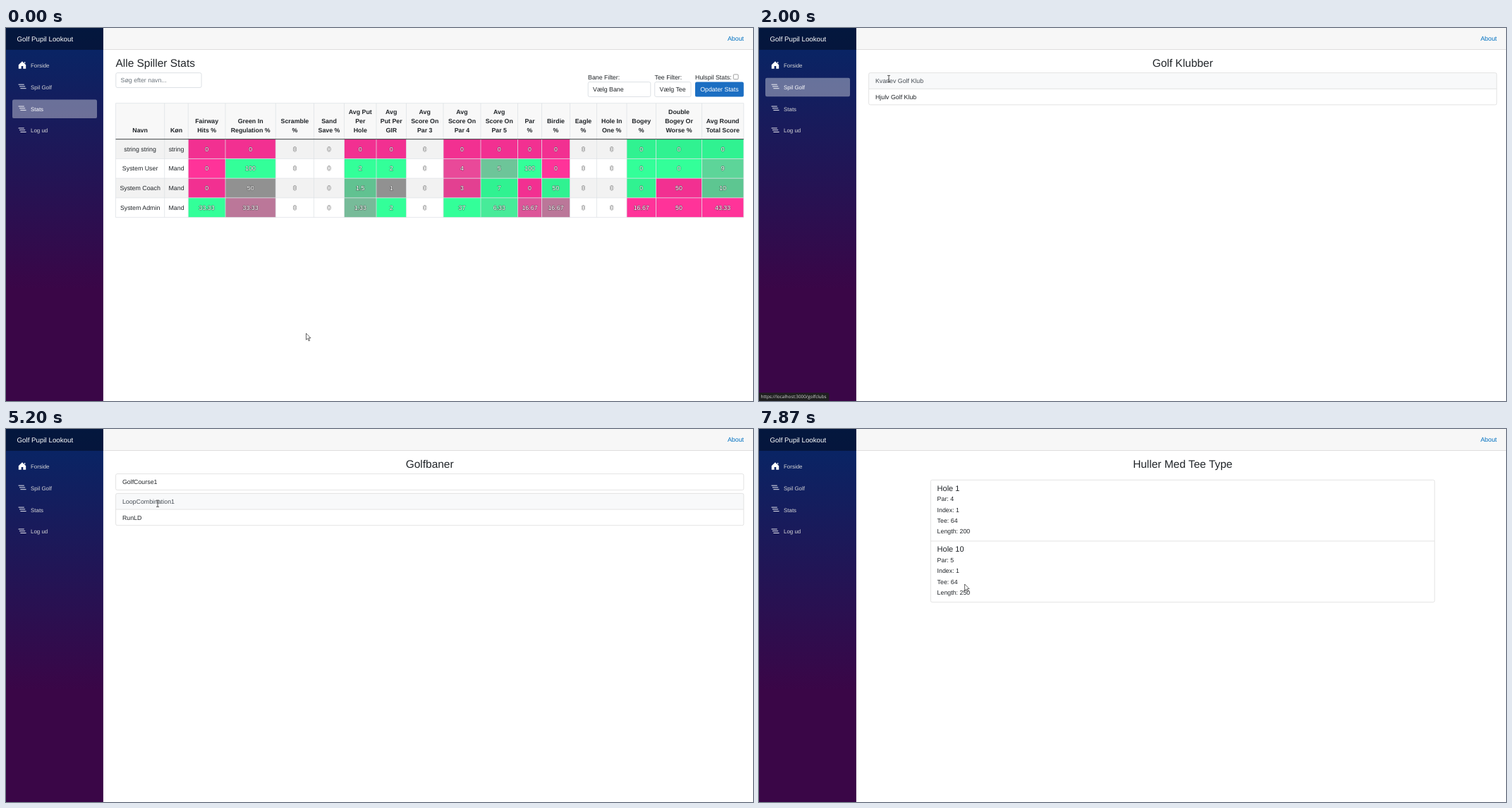
Write an HTML page that moves like this. It is 1059x529 px and loops after 8000 ms.

```html
<!DOCTYPE html>
<html lang="da">
<head>
<meta charset="utf-8">
<title>Golf Pupil Lookout</title>
<style>
  html, body { margin: 0; width: 100%; height: 100%; overflow: hidden; background: #fff; }
  svg { display: block; width: 100%; height: 100%; cursor: default; }
  text { font: 8.83px "Liberation Sans", Arial, sans-serif; fill: #212529; text-rendering: geometricPrecision; white-space: pre; }
  .h { font-size: 15.45px; }
  .h5 { font-size: 11.03px; }
  .m { text-anchor: middle; }
  .b { font-weight: bold; }
  .nav { font-size: 7.94px; fill: #d7d7d7; }
  .on { fill: #fff; }
  .cell { fill: #fff; stroke: rgba(50, 50, 50, .62); stroke-width: 1px; paint-order: stroke; }
  .box { fill: none; stroke: #dcdcdc; stroke-width: .8; }
  .field { fill: #fff; stroke: #ced4da; stroke-width: .7; }
  .url { font: 6.33px "Open Sans", "Noto Sans", sans-serif; fill: #dcdcdc; }
</style>
</head>
<body>
<svg id="stage" viewBox="0 0 1059 529" xmlns="http://www.w3.org/2000/svg"></svg>
<script>
const text = (x, y, s, cls = '') => `<text x="${x}" y="${y}" class="${cls}">${s}</text>`;
const rect = (x, y, w, h, attrs = '') => `<rect x="${x}" y="${y}" width="${w}" height="${h}" ${attrs}/>`;
const group = (id, body) => `<g id="${id}">${body}</g>`;
const title = s => text(600.65, 55.2, s, 'h m');

// Sidebar and top bar
const NAV = ['Forside', 'Spil Golf', 'Stats', 'Log ud'];
const NAV_STEP = 30.9;

function navItem(label, i) {
  const y = 53 + i * NAV_STEP;
  const icon = i
    ? `<path d="M18 ${y - 3.7}h7.4M19.4 ${y - 1}h7.4M20.8 ${y + 1.8}h7.4" stroke="#fff" stroke-width=".9" stroke-linecap="round"/>`
    : '<path d="M23 47.3l5.2 5v5.4h-3.9v-3.6h-2.6v3.6h-3.9v-5.4zM26 48h1.2v2.6l-1.2-1.2z" fill="#fff"/>';
  return rect(9, y - 13.2, 120, 26.5, 'rx="2.2" fill="#fff" class="navbg"') + icon + text(35, y + 2.7, label, 'nav');
}

const chrome = `
  <defs><linearGradient id="side" x2="0" y2="1">
    <stop stop-color="#052767"/><stop offset=".7" stop-color="#3a0647"/>
  </linearGradient></defs>
  ${rect(0, 0, 1059, 529, 'fill="#fff"')}
  ${rect(138, 0, 921, 30.9, 'fill="#f7f7f7"')}
  ${rect(138, 30.2, 921, .7, 'fill="#d6d5d5"')}
  ${rect(0, 0, 137.9, 529, 'fill="url(#side)"')}
  ${rect(0, 0, 137.9, 30.9, 'fill="#000" opacity=".4"')}
  <text x="15.5" y="18.6" class="on" style="font-size:9.75px">Golf Pupil Lookout</text>
  <text x="1046" y="18.2" text-anchor="end" style="fill:#0071c1">About</text>
  ${NAV.map(navItem).join('')}`;

// Stats table
const EDGES = [155.5, 224.7, 258.3, 311, 382.3, 436.5, 479.5, 525, 567.5, 620, 673,
  725.5, 759.5, 799.5, 837.5, 880, 921.5, 986.5, 1045.8];
const HEADS = ('Navn|Køn|Fairway,Hits %|Green In,Regulation %|Scramble,%|Sand,Save %|Avg Put,Per,Hole|' +
  'Avg,Put Per,GIR|Avg,Score On,Par 3|Avg,Score On,Par 4|Avg,Score On,Par 5|Par,%|Birdie,%|Eagle,%|' +
  'Hole In,One %|Bogey,%|Double,Bogey Or,Worse %|Avg Round,Total Score').split('|');
const PLAYERS = [
  'string string|string|0|0|0|0|0|0|0|0|0|0|0|0|0|0|0|0',
  'System User|Mand|0|100|0|0|2|2|0|4|5|100|0|0|0|0|0|9',
  'System Coach|Mand|0|50|0|0|1.5|1|0|3|7|0|50|0|0|0|50|10',
  'System Admin|Mand|33.33|33.33|0|0|1.33|2|0|37|6.33|16.67|16.67|0|0|16.67|50|43.33'
].map(r => r.split('|'));
const TOP = 106.7, BODY = 157.7, ROW = 27.72, LOW_IS_GOOD = 15;

function shade(col, value, striped) {
  const max = Math.max(...PLAYERS.map(p => +p[col]));
  if (!max) return null;
  const p = col >= LOW_IS_GOOD ? 1 - value / max : value / max;
  const k = striped ? .95 : 1;
  return `rgb(${[255 - 204 * p, 51 + 204 * p, 153].map(c => Math.round(c * k))})`;
}

function table() {
  const bottom = BODY + 4 * ROW, left = EDGES[0], right = EDGES[18], width = right - left;
  const mid = c => (EDGES[c] + EDGES[c + 1]) / 2;
  let out = rect(left, TOP, width, BODY - TOP, 'fill="#f8f8f8"');
  HEADS.forEach((head, c) => {
    const lines = head.split(',');
    lines.forEach((s, i) => out += text(mid(c), 148.4 - 13.24 * (lines.length - 1 - i), s, 'm b'));
  });
  let fills = '', labels = '';
  PLAYERS.forEach((player, r) => {
    const y = BODY + r * ROW, striped = r % 2 === 0;
    if (striped) fills += rect(left, y, width, ROW, 'fill="#f2f2f2"');
    player.forEach((s, c) => {
      const color = c > 1 && shade(c, +s, striped);
      if (color) fills += rect(EDGES[c], y, EDGES[c + 1] - EDGES[c], ROW, `fill="${color}"`);
      labels += text(mid(c), y + 16.95, s, c > 1 ? 'm cell' : 'm');
    });
  });
  let lines = `M${left} ${TOP}H${right}`;
  for (let r = 1; r < 5; r++) lines += `M${left} ${BODY + r * ROW}H${right}`;
  EDGES.forEach(x => lines += `M${x} ${TOP}V${bottom}`);
  return out + fills + `<path d="${lines}" stroke="#dee2e6" stroke-width=".75"/>` +
    `<path d="M${left} ${BODY}H${right}" stroke="#2b2f33" stroke-width=".9"/>` + labels;
}

const field = (x, w, y = 76.6) => rect(x, y, w, 20.9, 'rx="2.2" class="field"');
const stats = text(155.5, 55.2, 'Alle Spiller Stats', 'h') +
  field(155.8, 121.3, 63.6) + '<text x="162.5" y="77" style="fill:#6c757d">Søg efter navn...</text>' +
  text(825, 72.7, 'Bane Filter:') + text(919.5, 72.7, 'Tee Filter:') + text(977, 72.7, 'Hulspil Stats:') +
  rect(1031.3, 65.9, 6.8, 6.8, 'rx="1.2" fill="#fff" stroke="#767676" stroke-width=".7"') +
  field(825.2, 88.6) + text(832, 90.1, 'Vælg Bane') +
  field(919.7, 51.3) + text(926.5, 90.1, 'Vælg Tee') +
  rect(977, 76.5, 68.8, 21.1, 'rx="2.2" fill="#1b6ec2"') + text(1011.4, 90.1, 'Opdater Stats', 'm on') + table();

// List pages
const WIDE = [155.6, 1045.8], NARROW = [243.4, 957.8];
const LINE = 22.65;

function list([x0, x1], y, labels, h = LINE, draw) {
  const w = x1 - x0;
  const rows = labels.map((label, i) => {
    const top = y + i * h;
    if (draw) return draw(x0 + 9.2, top, label);
    return `<g class="row" data-y="${top}" data-x="${x0}" data-w="${w}">` +
      rect(x0, top, w, h, 'fill="#fff"') + text(x0 + 9.3, top + 14.5, label) + '</g>';
  });
  const seams = labels.slice(1).map((_, i) => `M${x0} ${y + (i + 1) * h}h${w}`).join('');
  return rows.join('') + rect(x0, y, w, h * labels.length, 'rx="2.2" class="box"') + `<path class="box" d="${seams}"/>`;
}

const hole = (x, y, [name, ...facts]) => text(x, y + 15.5, name, 'h5') +
  ['Par', 'Index', 'Tee', 'Length'].map((k, i) => text(x, y + 29.8 + i * 15.45, `${k}: ${facts[i]}`)).join('');

const clubs = title('Golf Klubber') + group('clubList', list(WIDE, 63.6, ['Kvarlev Golf Klub', 'Hjulv Golf Klub']));
const courses = title('Golfbaner') + list(WIDE, 63.6, ['GolfCourse1'], 23) +
  group('loops', list(WIDE, 91.4, ['LoopCombination1', 'RunLD']));
const tees = title('Vælg Tee Type') +
  text(243.4, 81.6, '<tspan class="b">Loop Combination:</tspan> LoopCombination1') +
  text(243.4, 103.7, 'Select a Tee Type:', 'b') + list(NARROW, 116.5, [64, 58, 55, 50, 43]);
const holes = title('Huller Med Tee Type') +
  list(NARROW, 72.3, [['Hole 1', 4, 1, 64, 200], ['Hole 10', 5, 1, 64, 250]], 86.65, hole);

const status = group('status', '<path d="M0 517.3H97.3Q99.3 517.3 99.3 519.3V529H0Z" fill="#1f1f20"/>' +
  text(2.6, 525.4, 'https://localhost:3000/golfclubs', 'url'));

const pointer = group('pointer', `
  <path id="arrow" d="M0 0V9.2L2.1 7.2 3.7 10.8 5.1 10.2 3.6 6.7H6.5Z" fill="#fff" stroke="#111" stroke-width=".65"/>
  <path id="beam" d="M-2 -4.6H2M0 -4.6V4.6M-2 4.6H2" fill="none" stroke="#333" stroke-width=".8"/>
  <path id="hand" d="M-1 .8Q0 -.6 1 .8V4.2L4.6 5Q5.4 5.3 5.3 6.2L4.5 10V12.3H-.8V10.8L-3.4 7.4Q-3.4 6 -2.2 6.4L-1 7.3Z" fill="#fff" stroke="#111" stroke-width=".7"/>`);

const SCENES = [[0, 'stats', stats], [1265, 'clubs', clubs], [3065, 'courses', courses],
  [5865, 'tees', tees], [7130, 'holes', holes]];

const stage = document.getElementById('stage');
stage.innerHTML = chrome + SCENES.map(([, id, body]) => group(id, body)).join('') + status + pointer;
const $ = id => document.getElementById(id);
const show = (el, on) => el.setAttribute('display', on ? 'inline' : 'none');
const navBgs = [...document.querySelectorAll('.navbg')];
const navTexts = [...document.querySelectorAll('.nav')];

// Pointer track: time, x, y
const TRACK = [[67, 425.5, 433], [933, 86, 73], [1733, 86, 73], [2000, 184, 72], [2600, 212, 77],
  [2733, 212, 96.5], [3467, 212, 97], [3533, 214, 97], [3700, 219, 128], [3933, 210, 76], [4867, 210, 76],
  [5200, 215, 105.7], [5400, 215, 105.7], [5533, 215, 106.3], [6333, 215, 106], [6400, 217.6, 105.6],
  [6600, 289.6, 127], [7533, 289.6, 127], [7867, 291.6, 220]];
const PRESSES = [[2930, 3065], [4265, 4395], [5800, 5865], [7065, 7130]];

const ramp = (t, a, b) => Math.min(1, Math.max(0, (t - a) / (b - a)));

function pointerAt(t) {
  const i = TRACK.findIndex(k => k[0] > t);
  if (i < 1) return TRACK[i ? TRACK.length - 1 : 0].slice(1);
  const [t0, x0, y0] = TRACK[i - 1], [t1, x1, y1] = TRACK[i];
  const u = ramp(t, t0, t1), e = u * u * (3 - 2 * u);
  return [x0 + (x1 - x0) * e, y0 + (y1 - y0) * e];
}

const inside = (px, py, x, y, w, h) => px >= x && px <= x + w && py >= y && py <= y + h;

function render(t) {
  const [px, py] = pointerAt(t);
  const scene = SCENES.filter(s => t >= s[0]).pop()[1];
  SCENES.forEach(([, id]) => show($(id), id === scene));
  show($('clubList'), t >= 1330);
  show($('loops'), t >= 4395);

  const active = { clubs: 1, stats: 2 }[scene];
  let overNav = false;
  navBgs.forEach((bg, i) => {
    const over = inside(px, py, 9, 39.8 + i * NAV_STEP, 120, 26.5);
    overNav = overNav || over;
    bg.setAttribute('opacity', i === active ? .37 : over ? .1 : 0);
    navTexts[i].style.fill = i === active || over ? '#fff' : '';
  });

  const pressed = PRESSES.some(([a, b]) => t >= a && t < b);
  $(scene).querySelectorAll('.row').forEach(row => {
    const { x, y, w } = row.dataset;
    const over = inside(px, py, +x, +y, +w, LINE);
    row.firstChild.setAttribute('fill', over ? '#f8f9fa' : '#fff');
    row.lastChild.style.fill = over && !pressed ? '#495057' : '';
  });

  const overText = [...$(scene).querySelectorAll('text')].some(el => {
    const b = el.getBBox();
    return inside(px, py, b.x, b.y, b.width, b.height);
  });
  const kind = overNav ? 'hand' : overText ? 'beam' : 'arrow';
  ['arrow', 'beam', 'hand'].forEach(id => show($(id), id === kind));
  $('pointer').setAttribute('transform', `translate(${px} ${py})`);
  $('status').setAttribute('opacity', ramp(t, 1000, 1200) - ramp(t, 2066, 2333));
}

const LOOP = 8000, TICK = 1000 / 15;
const start = performance.now();
function frame(now) {
  const t = Math.max(0, now - start) % LOOP;
  render(Math.round(Math.floor((t + 4) / TICK) * TICK) % LOOP);
  requestAnimationFrame(frame);
}
frame(start);
</script>
</body>
</html>
```
